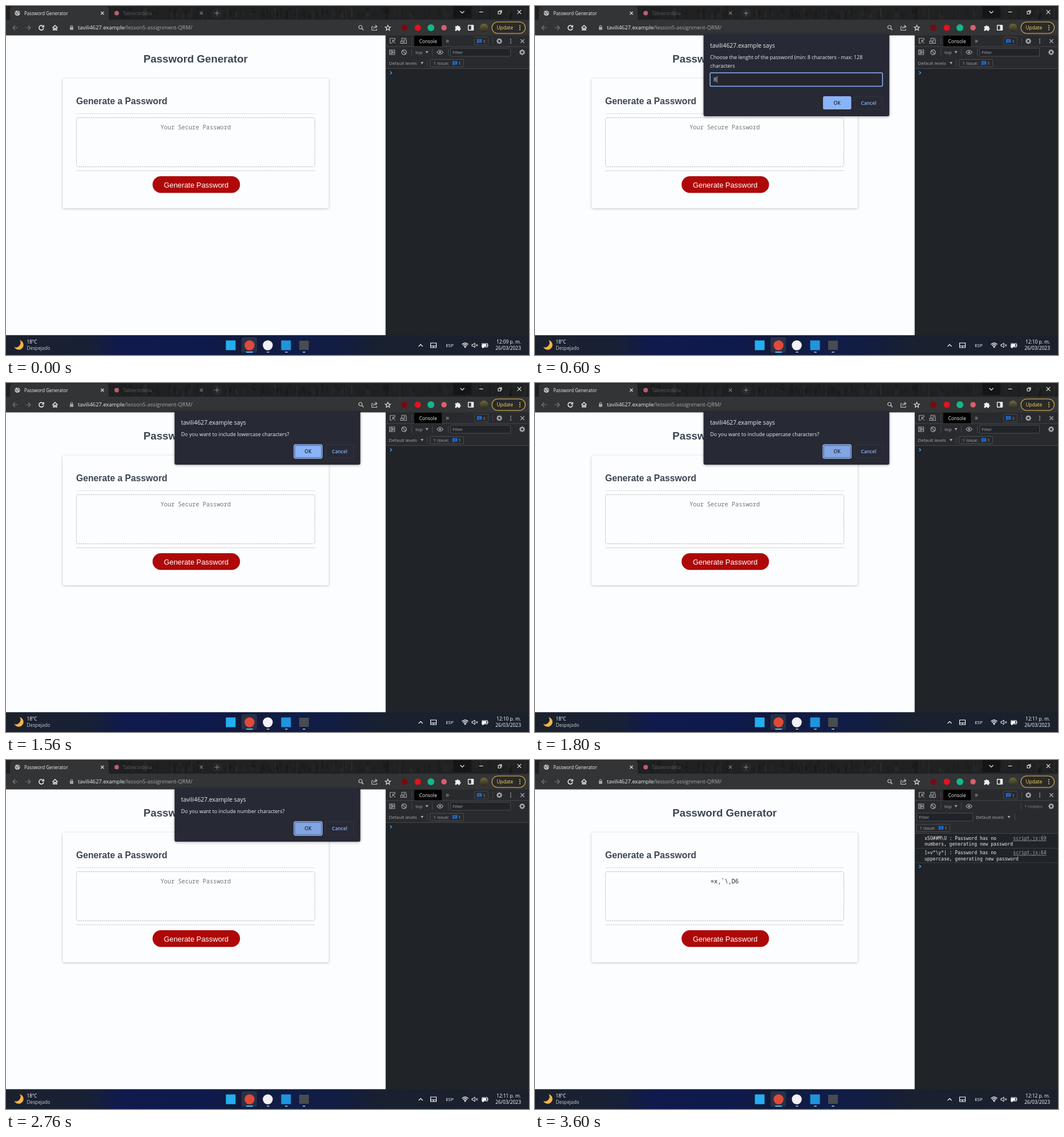
Animation of 917 by 611 pixels, one loop 4.2 s. Source, as an HTML page with a canvas:

```html
<!DOCTYPE html>
<html lang="en">
<head>
<meta charset="utf-8">
<title>Password Generator</title>
<style>
  html, body { margin: 0; width: 100%; height: 100%; overflow: hidden; background: #202124; }
  canvas { display: block; }
</style>
</head>
<body>
<canvas id="stage" width="917" height="611"></canvas>
<script>
const ctx = document.getElementById('stage').getContext('2d');
const UI = '"Open Sans", sans-serif';
const ARIAL = '"Liberation Sans", Arial, sans-serif';
const MONO = '"Noto Sans Mono", monospace';
const CODE = '"DejaVu Sans Mono", monospace';
const BLUE = '#8ab4f8', GREY = '#a5aab0', LIGHT = '#eceef1', PANEL = '#202328', BAR = '#333435';
const HOST = 'tavili4627.example';
const STEP = 600;

const QUESTIONS = { 2: 'lowercase', 3: 'uppercase', 4: 'number', 5: 'special' };
const MINUTES = ['09', '10', '10', '11', '11', '11', '12'];

function box(x, y, w, h, fill, radius = 0, border, lineWidth = 1) {
  ctx.beginPath();
  ctx.roundRect(x, y, w, h, radius);
  if (fill) { ctx.fillStyle = fill; ctx.fill(); }
  if (border) { ctx.strokeStyle = border; ctx.lineWidth = lineWidth; ctx.stroke(); }
}

function shadowBox(x, y, w, h, fill, radius, shadow, blur) {
  ctx.save();
  ctx.shadowColor = shadow;
  ctx.shadowBlur = blur;
  ctx.shadowOffsetY = 1;
  box(x, y, w, h, fill, radius);
  ctx.restore();
}

function text(str, x, y, size, color, font = UI, align = 'left', weight = 400) {
  ctx.font = `${weight} ${size}px ${font}`;
  ctx.fillStyle = color;
  ctx.textAlign = align;
  ctx.fillText(str, x, y);
  return ctx.measureText(str).width;
}

function dot(x, y, r, color) {
  ctx.beginPath();
  ctx.arc(x, y, r, 0, 7);
  ctx.fillStyle = color;
  ctx.fill();
}

// Icon outline centred on (x, y)
function icon(x, y, d, color = LIGHT, width = 1.1, fill) {
  ctx.save();
  ctx.translate(x, y);
  const path = new Path2D(d);
  if (fill) { ctx.fillStyle = fill; ctx.fill(path); }
  if (width) { ctx.strokeStyle = color; ctx.lineWidth = width; ctx.stroke(path); }
  ctx.restore();
}

const circle = r => `M${-r} 0a${r} ${r} 0 1 1 ${2 * r} 0a${r} ${r} 0 1 1 ${-2 * r} 0`;
const cross = r => `M${-r} ${-r}L${r} ${r}M${r} ${-r}L${-r} ${r}`;
const DOWN = 'M-2.5 -2H2.5L0 2Z';

function kebab(x, y, color, gap = 3.2) {
  for (let i = -1; i < 2; i++) dot(x, y + i * gap, 1, color);
}

function gear(x, y) {
  for (let i = 0; i < 8; i++) {
    const a = i * Math.PI / 4, c = Math.cos(a), s = Math.sin(a);
    icon(x, y, `M${3 * c} ${3 * s}L${5 * c} ${5 * s}`, GREY, 1.9);
  }
  icon(x, y, circle(2.9), GREY, 2);
}

function grain() {
  let seed = 11;
  const rnd = () => (seed = seed * 16807 % 2147483647) / 2147483647;
  for (let i = 0; i < 170; i++) {
    const x = 180 + rnd() * 737, y = rnd() * 14;
    box(x, y, 1 + rnd() * 4, 4 + rnd() * (22 - y), `rgba(${rnd() < .65 ? '5,5,6' : '70,70,68'},${.08 + rnd() * .14})`);
  }
}

function browserBar() {
  box(0, 0, 917, 25, '#202122');
  grain();
  box(784, 0, 32, 21, '#141516');
  box(0, 24, 917, 27.6, BAR);
  box(7, 1, 173, 30, BAR, 5);

  icon(20, 12.5, circle(4.6), '#c4c7ca', 0, '#c4c7ca');
  icon(20, 12.5, 'M-4 -1L-1 0L0 3M0 -4L2 -1L4 0', '#4a4c4f', 1.2);
  text('Password Generator', 32, 15.5, 8.05, LIGHT);
  icon(169, 12.5, cross(2.6), LIGHT, 1.2);
  dot(194, 12.5, 4, '#b8606c');
  text('Tabrecordelia', 205, 15.5, 8.05, '#5c5e60');
  icon(342.5, 12.5, cross(2.6), '#85878a');
  dot(370, 12.5, 9, '#272829');
  icon(370, 12.5, 'M-4 0H4M0 -4V4', '#85878a');

  icon(800, 10.5, 'M-3.5 -1.5L0 2L3.5 -1.5', LIGHT, 1.2);
  icon(833, 10.5, 'M-3.5 0H3.5');
  icon(866, 11, 'M-3 -1.5H1.5V3H-3ZM-1.5 -3H3V1.5');
  icon(900, 10.5, cross(3.3));

  icon(16, 38, 'M4.5 0H-4M0 -4L-4 0L0 4', '#77797c', 1.2);
  icon(39, 38, 'M-4.5 0H4M0 -4L4 0L0 4', '#77797c', 1.2);
  icon(62, 38, 'M3 -2.8A4.1 4.1 0 1 0 4 1M4.2 -4.5V-1.2H.8', LIGHT, 1.5);
  icon(86, 38, 'M-4.5 .2L0 -4L4.5 .2M-3 -.5V4H-1V1H1V4H3V-.5', LIGHT, 1.3);
  box(112, 36.7, 6, 5, GREY, .7);
  icon(115, 36.7, 'M-1.7 .5V-1a1.7 1.7 0 0 1 3.4 0V.5', GREY);
  const width = text(HOST, 126, 41.3, 9.44, LIGHT);
  text('/lesson5-assignment-QRM/', 126 + width, 41.3, 9.44, GREY);

  icon(621.5, 37, circle(3), '#c4c7ca', 1.2);
  icon(621.5, 37, 'M2.2 2.2L5.3 5.3', '#c4c7ca', 1.5);
  icon(646, 38, 'M-2 -2H-4.5V4.5H4V2M-1.5 2C-1 -1 1 -2 3.5 -2M1.5 -4.5L4.5 -2L1.5 .5', '#c4c7ca');
  icon(669.5, 38.3, 'M0 -4.7L1.3 -1.5L4.7 -1.3L2 .9L2.9 4.2L0 2.3L-2.9 4.2L-2 .9L-4.7 -1.3L-1.3 -1.5Z');
  dot(698.5, 38, 5.2, '#800610');
  dot(722, 38, 5.5, '#e5121c');
  dot(745, 38, 6, '#12b886');
  dot(768, 38, 4.8, '#d8606b');
  icon(792, 38.5, 'M-4.5 -3H-1.8A1.6 1.6 0 0 1 1.4 -3H4V-.3A1.5 1.5 0 0 1 4 2.7V5H1A1.5 1.5 0 0 0 -2 5H-4.5V2A1.5 1.5 0 0 0 -4.5 -.8Z', '', 0, LIGHT);
  box(810.5, 33.8, 9, 8.5, null, .5, LIGHT, 1.4);
  box(815.5, 34, 4, 8, LIGHT);
  const photo = ctx.createLinearGradient(0, 31, 0, 46);
  photo.addColorStop(0, '#6c673c');
  photo.addColorStop(1, '#29261c');
  dot(838, 38, 7.3, photo);
  box(852, 28, 58.5, 20, '#2a2a29', 10, '#e5bd58', 1.1);
  text('Update', 860.5, 41, 8.4, '#fdd663', UI, 'left', 500);
  kebab(901, 38, '#fdd663', 3.6);
}

function page(password) {
  box(0, 51, 665.5, 525.6, '#fcfdff');
  text('Password Generator', 332.5, 98.5, 18.7, '#3b4654', ARIAL, 'center', 700);
  shadowBox(99.3, 127, 466.5, 227, '#fcfdff', 3, 'rgba(50,58,68,.3)', 4);

  text('Generate a Password', 123, 172, 15.73, '#3b4654', ARIAL, 'left', 700);
  box(123, 188, 419, 1, '#e0e2e5');
  box(123, 288, 419, 1, '#d3d6d9');
  ctx.setLineDash([2.2, 1.5]);
  box(123.5, 195.5, 418, 86, null, 3, '#a9abad', .9);
  ctx.setLineDash([]);
  text(password || 'Your Secure Password', 332.5, 215.5, 10.28, password ? '#222' : '#757575', MONO, 'center');
  box(257, 298, 153.3, 29.3, '#af0808', 14.6);
  text('Generate Password', 333.5, 317.6, 12.85, '#fff', ARIAL, 'center');
}

function filterBox(x, y, w, h) {
  box(x + .5, y + .5, w, h, PANEL, 1, '#4a4c50');
  text('Filter', x + 4, y + 10.5, 7.8, GREY);
}

function issueCount(x, y) {
  box(x + .5, y + .5, 59, 13, null, 1, '#4a4c50');
  text('1 Issue:', x + 6.5, y + 10, 7.8, GREY);
  message(x + 44, y + 7);
  text('1', x + 50, y + 10, 7.8, GREY);
}

function message(x, y) {
  icon(x, y, 'M-4 -3.5H4V2.5H-2L-4 4.3Z', '', 0, '#1a73e8');
  icon(x, y, 'M-2.2 -1.6H2.2M-2.2 .5H1.5', '#202124', .8);
}

function levels(x) {
  text('Default levels', x, 103, 7.85, GREY);
  icon(x + 58, 100, DOWN, '', 0, GREY);
}

function prompt(y) {
  icon(675, y, 'M-1.5 -2.5L1.5 0L-1.5 2.5', '#4c9df3', 1.3);
}

function log(y, sample, missing, line) {
  text(`${sample} : Password has no`, 683, y, 8.05, LIGHT, CODE);
  text(`${missing}, generating new password`, 683, y + 10.3, 8.05, LIGHT, CODE);
  text('script.js:' + line, 896.5, y, 8.05, GREY, CODE, 'right');
  box(838.5, y + 1.2, 58, .8, GREY);
  box(666, y + 14, 251, 1, '#3a3c40');
}

function devtools(done) {
  box(665.5, 51, 251.5, 526, PANEL);
  box(666, 51, 251, done ? 77 : 58, '#292a2d');
  box(666, 70.5, 251, 1, '#45474b');
  box(666, done ? 128 : 109, 251, 1, '#45474b');

  icon(678, 61, 'M4 -1V-4.3H-4.5V4H-1M0 -1L4.5 4.5M0 3V-1H4', GREY);
  icon(697, 61, 'M-3 0V-4.5H5M-1 4.5H-5V.5H-1ZM1 -2H5V4.5H1Z', GREY);
  for (const [x, y] of [[711, 55], [853, 55], [711, 75], [747, 75], [775, 75]]) {
    if (!done || x !== 775) box(x, y, 1, 12, '#45474b');
  }
  box(716, 52, 48, 18.5, '#000');
  text('Console', 740, 64.5, 8.35, LIGHT, UI, 'center');
  text('»', 774, 65, 12, GREY, UI, 'center');
  box(821.5, 54.5, 24, 13.5, null, 1, '#45474b');
  message(830, 61.5);
  text('1', 836.5, 64.5, 8, GREY);
  gear(865, 61.5);
  kebab(885, 61.5, GREY);
  icon(905.5, 61.5, cross(3.2), GREY, 1.3);

  icon(677, 81, 'M-4.5 -4H4.5V4H-4.5ZM-2 -4V4M0 -2L3 0L0 2Z', GREY);
  icon(698, 81, circle(4.2) + 'M-3 -3L3 3', GREY, 1.2);
  text('top', 718, 84, 8, GREY);
  icon(738, 81, DOWN, '', 0, GREY);
  icon(761, 81, 'M-5.3 0Q0 -7 5.3 0Q0 7 -5.3 0Z', GREY);
  dot(761, 81, 1.8, GREY);
  gear(905, 81);

  if (!done) {
    filterBox(779, 73.5, 105, 14);
    levels(671.5);
    box(738, 94, 1, 12, '#45474b');
    issueCount(743, 93);
    prompt(117);
    return;
  }
  box(852, 75, 1, 12, '#45474b');
  text('1 hidden', 858, 84, 7.9, '#7d8287');
  filterBox(669, 92.5, 98, 14);
  levels(773);
  box(841, 94, 1, 12, '#45474b');
  issueCount(668, 112);
  log(140, 'xSO##M\\U', 'numbers', 69);
  log(165.3, '[=v*\\y*|', 'uppercase', 64);
  prompt(186.5);
}

function taskbar(minute) {
  const night = ctx.createLinearGradient(0, 0, 917, 0);
  [[0, '#1b212c'], [.16, '#182036'], [.22, '#101a4c'], [.39, '#0f1a4c'],
   [.45, '#111a3a'], [.55, '#101d48'], [.63, '#111d42'], [.72, '#19202f'], [1, '#1b212c']]
    .forEach(([at, color]) => night.addColorStop(at, color));
  box(0, 576.6, 917, 35, night);

  icon(24, 585, 'M0 0a8.5 8.5 0 1 1 -9.5 12a8 8 0 0 0 9.5 -12Z', '', 0, '#f6b345');
  text('18°C', 36.5, 591, 8.2, '#fff');
  text('Despejado', 36.5, 602.3, 8.25, '#c9ccd1');

  box(385.5, 585.5, 17, 17, '#24aef0');
  box(413, 580, 27, 27, '#293047', 3);
  box(421, 605, 12, 2, '#4cc2ff', 1);
  dot(427, 594, 8.7, '#e04a3a');
  dot(459, 594, 8.7, '#f3f1f4');
  box(482.5, 585.5, 17, 17, '#1f95de');
  box(514, 586, 17, 16, '#484b50');
  for (const x of [457, 489, 520]) box(x, 605, 5, 2, '#9aa0ad', 1);

  icon(727, 594, 'M-3.5 2L0 -1.5L3.5 2', '#fff', 1.2);
  icon(749.5, 594, 'M-5 -4H5V4H-5ZM-5 1H5M0 1V4', '#fff');
  text('ESP', 778, 597, 8, '#fff', UI, 'center');
  icon(805, 594, 'M-5.5 -1.5Q0 -6.5 5.5 -1.5M-3.7 .5Q0 -3 3.7 .5M-2 2.5Q0 .7 2 2.5', '#fff', 1.2);
  dot(805, 597.5, 1.1, '#fff');
  icon(822, 594, 'M-5 -1.5H-3L0 -4V4L-3 1.5H-5ZM2 -1.8L5 1.8M5 -1.8L2 1.8', '#fff', 1);
  icon(840, 594, 'M-5 -3H4V3H-5ZM5 -1V1', '#fff');
  box(836, 592, 6, 4, '#fff');
  icon(836, 596, 'M-1 -4V-1M1 -4V-1M-2 -1H2V1L0 3Z', '#fff', .8, '#fff');
  text(`12:${minute} p. m.`, 903, 591, 8.35, '#fff', UI, 'right');
  text('26/03/2023', 903, 602.3, 8.45, '#fff', UI, 'right');
}

function dialog(question, hovered) {
  const height = question ? 93 : 143;
  const y = 50 + height - 35;
  shadowBox(295.5, 49, 325.8, height + 1, '#272934', [0, 0, 3, 3], 'rgba(0,0,0,.35)', 4);
  text(HOST + ' says', 307, 72.7, 10.37, LIGHT);

  if (question) {
    text(`Do you want to include ${question} characters?`, 307, 93, 8.95, LIGHT);
    box(505, y, 49.3, 23.8, null, 3, '#a3c3f9', 1.4);
    box(506.2, y + 1.2, 46.9, 21.4, hovered ? '#82a5e4' : BLUE, 2, '#4a6394', .8);
  } else {
    text('Choose the lenght of the password (min: 8 characters - max: 128', 307, 93, 8.95, LIGHT);
    text('characters', 307, 107.5, 8.95, LIGHT);
    box(307, 117, 302.3, 23.5, '#242630', 2, BLUE, 1.5);
    const width = text('8', 313, 132, 8.95, LIGHT);
    box(313.5 + width, 123, .8, 11, LIGHT);
    box(505, y, 49.5, 23, BLUE, 2.5);
  }
  text('OK', 529.5, y + 14.7, 8.5, '#202534', UI, 'center', 600);
  box(560.5, y + .5, 49, 22.5, null, 2.5, '#343744', .8);
  text('Cancel', 585, y + 14.7, 8.4, BLUE, UI, 'center', 600);
}

function draw(now) {
  const scene = Math.floor(now / STEP) % MINUTES.length;
  const done = scene === 6;
  devtools(done);
  page(done && '=x,`\\,D6');
  browserBar();
  taskbar(MINUTES[scene]);
  if (scene > 0 && !done) dialog(QUESTIONS[scene], scene > 2);
  requestAnimationFrame(draw);
}

requestAnimationFrame(draw);
</script>
</body>
</html>
```
